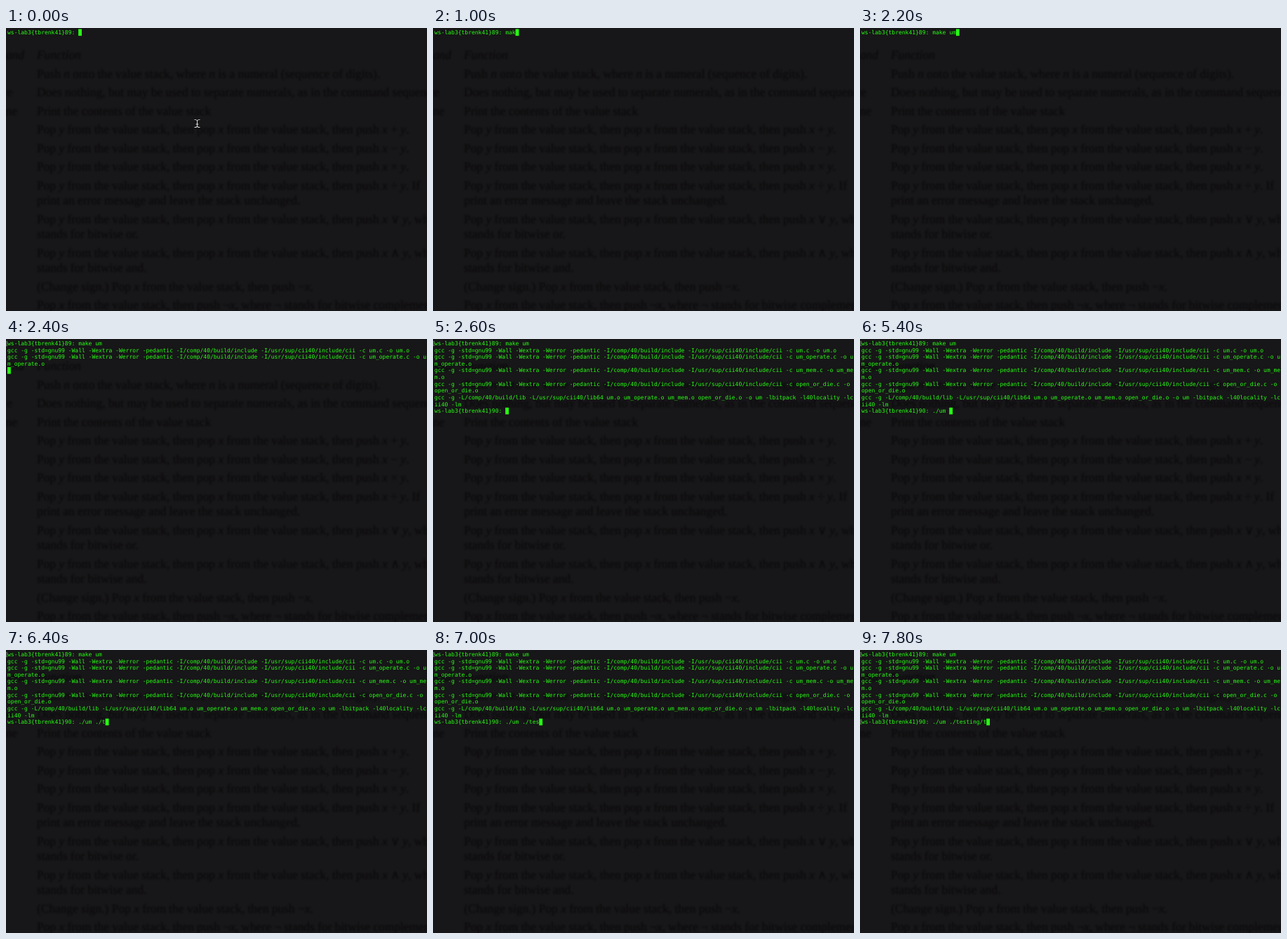
Write an HTML page with a canvas that moves like this. It is 600 px wide and 403 px high and loops after 8 s.

```html
<!DOCTYPE html>
<html lang="en">
<head>
<meta charset="utf-8">
<title>Terminal session</title>
<style>
  html, body { margin: 0; width: 100%; height: 100%; overflow: hidden; background: #171618; }
  canvas { display: block; }
</style>
</head>
<body>
<canvas id="stage" width="600" height="403"></canvas>
<script>
const WIDTH = 600, HEIGHT = 403, LOOP = 8000;
const CELL = 4.816, ROW = 9.62, LEFT = 2, TOP = 1.5;
const GREEN = '#28fe14';
const ctx = document.getElementById('stage').getContext('2d');

const HOST = 'ws-lab3{tbrenk41}';
const FLAGS = 'gcc -g -std=gnu99 -Wall -Wextra -Werror -pedantic ' +
  '-I/comp/40/build/include -I/usr/sup/cii40/include/cii -c ';
const BUILD = [
  FLAGS + 'um.c -o um.o',
  FLAGS + 'um_operate.c -o u', 'm_operate.o',
  FLAGS + 'um_mem.c -o um_me', 'm.o',
  FLAGS + 'open_or_die.c -o ', 'open_or_die.o',
  'gcc -g -L/comp/40/build/lib -L/usr/sup/cii40/lib64 um.o um_operate.o ' +
    'um_mem.o open_or_die.o -o um -lbitpack -l40locality -lc', 'ii40 -lm'
];

// Each entry: time in ms, then what has been typed by that time.
const MAKE_KEYS = [[600, 'm'], [800, 'ma'], [1000, 'mak'], [1200, 'make'],
  [1600, 'make '], [1800, 'make u'], [2000, 'make um']];
const RUN_KEYS = [[4600, '.'], [4800, './'], [5000, './u'], [5200, './um'],
  [5400, './um '], [6000, './um .'], [6200, './um ./'], [6400, './um ./t'],
  [6600, './um ./te'], [6800, './um ./tes'], [7200, './um ./testing/'],
  [7600, './um ./testing/t']];
const MOUSE_HIDDEN = 600, BUILD_START = 2400, BUILD_DONE = 2600, COMPLETED = 7200;

const typed = (keys, t) => keys.reduce((text, [at, value]) => t >= at ? value : text, '');

// Blurred manual page seen through the translucent window.
function makeBackdrop() {
  const canvas = document.createElement('canvas');
  canvas.width = WIDTH;
  canvas.height = HEIGHT;
  const c = canvas.getContext('2d');
  c.fillStyle = '#171618';
  c.fillRect(0, 0, WIDTH, HEIGHT);
  c.filter = 'blur(0.9px)';
  c.fillStyle = '#09080a';
  c.textRendering = 'geometricPrecision';
  c.textBaseline = 'alphabetic';

  // Words between asterisks are set in italics.
  const write = (text, x, y) => text.split('*').forEach((part, i) => {
    c.font = (i % 2 ? 'italic ' : '') + '17.4px "Liberation Serif", serif';
    c.fillText(part, x, y);
    x += c.measureText(part).width;
  });
  const pop = (op, tail = '.') => 'Pop *y* from the value stack, then pop *x* ' +
    `from the value stack, then push *x* ${op} *y*${tail}`;
  const rows = [
    [44, '*Function*'],
    [71, 'Push *n* onto the value stack, where *n* is a numeral (sequence of digits).'],
    [97, 'Does nothing, but may be used to separate numerals, as in the command sequence'],
    [124, 'Print the contents of the value stack'],
    [150, pop('+')],
    [177, pop('−')],
    [203, pop('×')],
    [230, pop('÷', '. If')],
    [251, 'print an error message and leave the stack unchanged.'],
    [278, pop('∨', ', where')],
    [299, 'stands for bitwise or.'],
    [326, pop('∧', ', where')],
    [347, 'stands for bitwise and.'],
    [374, '(Change sign.) Pop *x* from the value stack, then push −*x*.'],
    [400, 'Pop *x* from the value stack, then push ¬*x*, where ¬ stands for bitwise complement']
  ];
  rows.forEach(([y, text]) => write(text, 44, y));
  c.textAlign = 'right';
  c.font = 'italic 17.4px "Liberation Serif", serif';
  c.fillText('Command', 26, 44);
  c.font = '17.4px "Liberation Serif", serif';
  c.fillText('space', 9, 97);
  c.fillText('newline', 16, 124);
  return canvas;
}

function drawLine(text, row) {
  ctx.fillStyle = GREEN;
  [...text].forEach((char, col) =>
    ctx.fillText(char, LEFT + col * CELL, TOP + row * ROW + 7.5));
}

function drawMark(row) {
  ctx.fillStyle = '#7fae7a';
  ctx.fillText('[', -1.2, TOP + row * ROW + 7.5);
}

function drawCaret(col, row) {
  ctx.fillStyle = GREEN;
  ctx.fillRect(LEFT + col * CELL, TOP + row * ROW, CELL, ROW);
}

function drawMouse(x, y) {
  const beam = new Path2D(`M${x - 4} ${y - 5.5}q4 0 4 2q0 -2 4 -2M${x} ${y - 4}v8` +
    `M${x - 4} ${y + 5.5}q4 0 4 -2q0 2 4 2M${x - 2} ${y + 1}h4`);
  for (const [color, width] of [['#000', 2.6], ['#ddd', 1.1]]) {
    ctx.strokeStyle = color;
    ctx.lineWidth = width;
    ctx.stroke(beam);
  }
}

const backdrop = makeBackdrop();
ctx.font = '8px "DejaVu Sans Mono", monospace';
ctx.textRendering = 'geometricPrecision';

function render(t) {
  ctx.drawImage(backdrop, 0, 0);
  const lines = [`${HOST}89: ${typed(MAKE_KEYS, t)}`];
  if (t >= BUILD_DONE) lines.push(...BUILD, `${HOST}90: ${typed(RUN_KEYS, t)}`);
  else if (t >= BUILD_START) lines.push(...BUILD.slice(0, 3), '');

  lines.forEach(drawLine);
  const last = lines.length - 1;
  drawCaret(lines[last].length, last);
  if (t >= BUILD_START) drawMark(0);
  if (t >= COMPLETED) drawMark(last);
  if (t < MOUSE_HIDDEN) drawMouse(272.5, 136);
}

const start = performance.now();
function tick() {
  render((performance.now() - start) % LOOP);
  requestAnimationFrame(tick);
}
tick();
</script>
</body>
</html>
```
